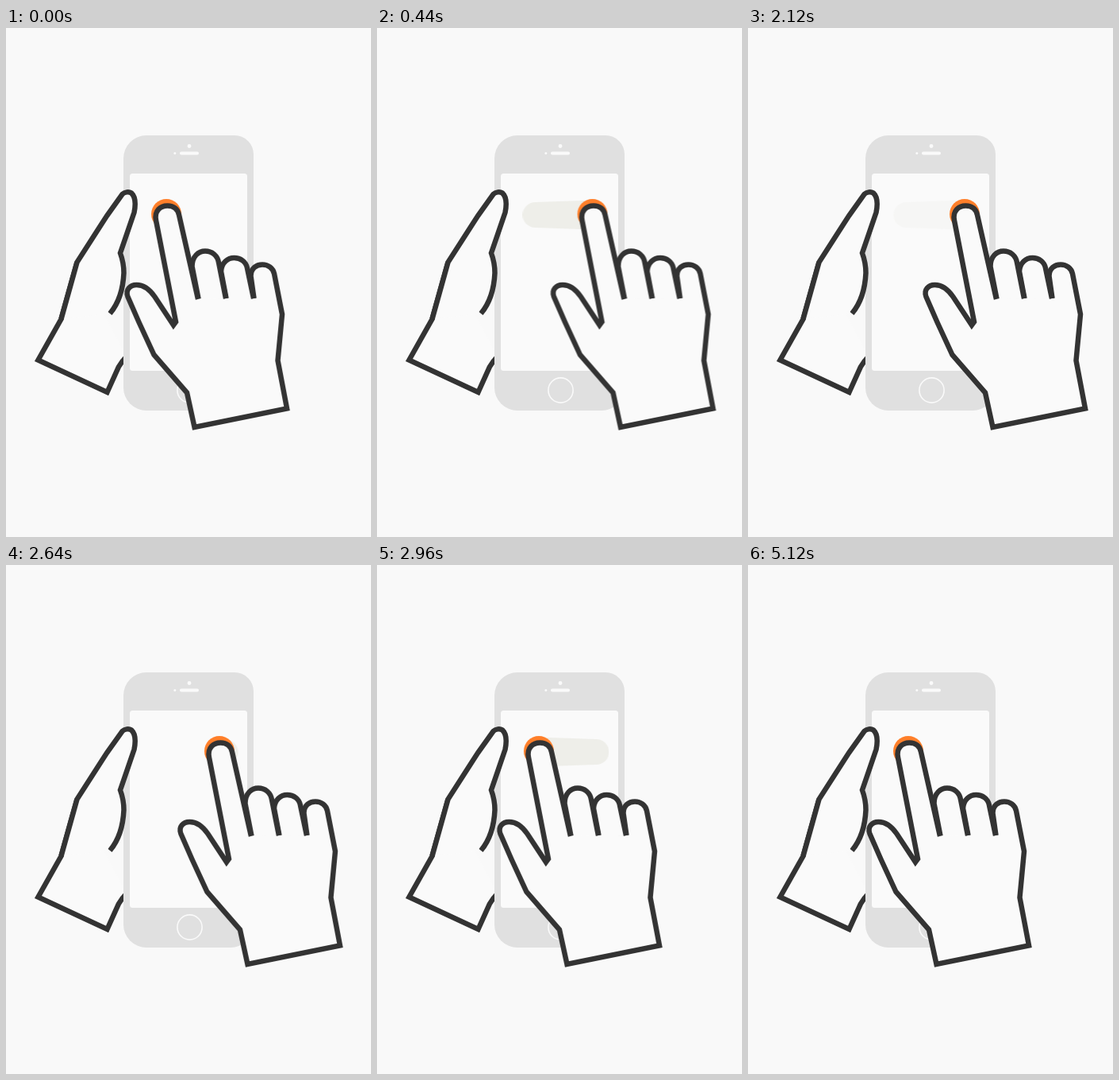
Animation of 460x640 px, one loop 5480 ms. Source, as an HTML page without scripts:

```html
<!DOCTYPE html>
<html lang="en">
<head>
<meta charset="utf-8">
<title>Swipe gesture</title>
<style>
  html, body { margin: 0; width: 100%; height: 100%; overflow: hidden; background: #f9f9f9; }
  svg { display: block; width: 100vw; height: 100vh; }

  .line { fill: none; stroke: #333; stroke-width: 6.5; stroke-miterlimit: 10; }
  .skin { fill: #fafafa; }
  .body { fill: #e0e0e0; }
  .detail { fill: #fafafa; }
  .touch { fill: #ff7f2a; }
  .trail { fill: #eeeee9; }

  .move, .trail, .trail path { animation: 5480ms linear -23ms infinite; }
  .move { animation-name: swipe; }
  .trail { animation-name: fade; }
  .trail path { animation-name: stretch; }
  .back, .back path { animation-delay: -2976ms; }

  /* Cubic ease in and out, split at the midpoint of each swipe */
  @keyframes swipe {
    0% { transform: translateX(0); animation-timing-function: cubic-bezier(.333, 0, .667, 0); }
    5.14% { transform: translateX(35.5px); animation-timing-function: cubic-bezier(.333, 1, .667, 1); }
    10.27% { transform: translateX(71px); }
    46.11% { transform: translateX(71px); animation-timing-function: cubic-bezier(.333, 0, .667, 0); }
    51.25% { transform: translateX(35.5px); animation-timing-function: cubic-bezier(.333, 1, .667, 1); }
    56.39%, 100% { transform: translateX(0); }
  }
  @keyframes stretch {
    0% { transform: scaleX(0); animation-timing-function: cubic-bezier(.333, 0, .667, 0); }
    5.14% { transform: scaleX(.5); animation-timing-function: cubic-bezier(.333, 1, .667, 1); }
    10.27%, 100% { transform: scaleX(1); }
  }
  @keyframes fade {
    0% { opacity: 1; }
    10.27% { opacity: 1; animation-timing-function: ease-in; }
    46.1%, 100% { opacity: 0; }
  }
</style>
</head>
<body>
<svg viewBox="0 0 460 640">
  <!-- Wrist behind the phone -->
  <path class="line skin" d="M152 413Q146 419 142 426L127.5 458 40.5 417.5 69.5 366 89.5 294.5"/>

  <!-- Phone -->
  <path class="body" d="M177 135H288A24 24 0 0 1 312 159V452A29 29 0 0 1 283 481
    H177A29 29 0 0 1 148 452V164A29 29 0 0 1 177 135z"/>
  <rect class="detail" x="156" y="183" width="148" height="248" rx="3.5"/>
  <circle class="detail" cx="231" cy="148.5" r="2.4"/>
  <circle class="detail" cx="212.8" cy="157.5" r="1.5"/>
  <rect class="detail" x="219" y="155.6" width="24" height="3.8" rx="1.9"/>
  <circle cx="231.5" cy="455.5" r="15.6" fill="none" stroke="#fafafa" stroke-width="1.6"/>

  <!-- Holding thumb -->
  <path class="line skin" d="M69.5 366 89.5 294.5 127.2 236 146.5 209
    C149.5 206 155 205.5 158 207.5C163 212 163.5 222 161.5 232L144 283
    C148 294 148.5 301 148.5 308C147.5 330 142 346 131 359"/>

  <!-- Swipe trails, the second one mirrored -->
  <g transform="translate(199.5 235)">
    <g class="trail">
      <circle r="16"/>
      <path d="M0-16 74-18.5V18.5L0 16z"/>
    </g>
  </g>
  <g transform="translate(276.5 235) scale(-1 1)">
    <g class="trail back">
      <circle r="16"/>
      <path d="M0-16 74-18.5V18.5L0 16z"/>
    </g>
  </g>

  <!-- Swiping hand -->
  <g class="move">
    <circle class="touch" cx="202" cy="234" r="19"/>
    <path class="line skin" d="M312.5 340 308.5 312C308.5 302 315.5 297.5 323 297.5
      C330.5 297.5 336.5 302 338 309L348 360 342.5 418 354 478.5 237.5 502 228 458.5 186.5 411
      167.5 370 153.5 338C150 329 156.5 323 164.5 323C173.5 323 180.5 328 187.5 338L211 373.5
      214 369.5 189 242C186.5 230 194.5 223.5 203.5 223.5C211.5 223.5 216.5 228 218 235
      L242 341"/>
    <path class="line skin" d="M277.5 340 271 306C271.5 295 279.5 289 287.5 289
      C295.5 289 302.5 294 304 302L312 340"/>
    <path class="line skin" d="M242.5 340.7 234.5 300C234.5 287 242.5 280.5 251 280.5
      C259.5 280.5 266.5 286 268 295L277 340"/>
  </g>
</svg>
</body>
</html>
```
